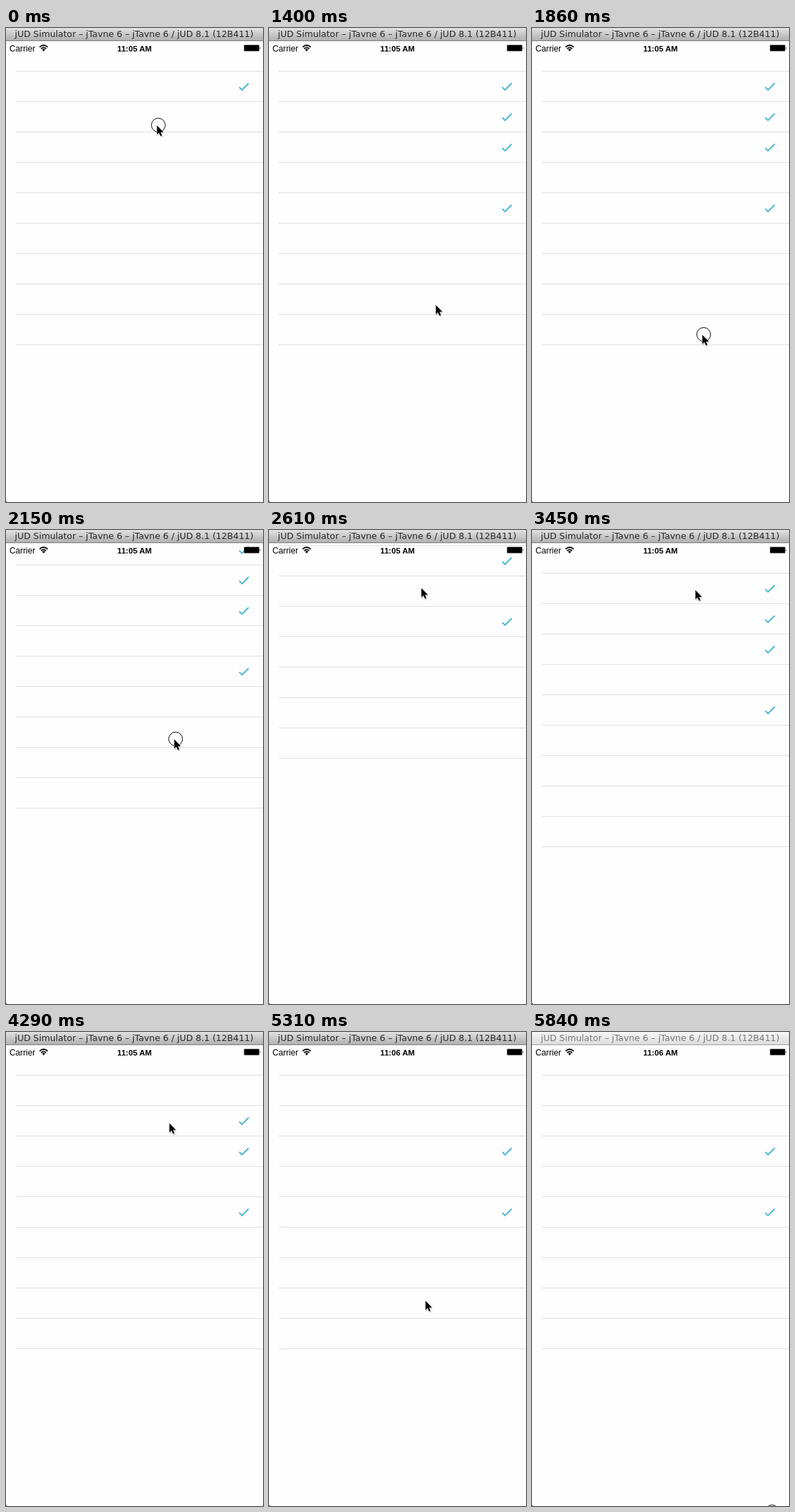
Recreate the animation shown at these times as an HTML page. Size 372x686 px, loop 5940 ms.

```html
<!DOCTYPE html>
<html lang="en">
<head>
<meta charset="utf-8">
<title>Checklist</title>
<style>
  html, body { margin: 0; width: 100%; height: 100%; overflow: hidden; background: #fefefe; }
  svg { display: block; width: 100%; height: 100%; }
  .title { font: 12.75px "DejaVu Sans", sans-serif; text-anchor: middle; }
  .status { font: 12.2px "Liberation Sans", Arial, sans-serif; }
  .clock { font: bold 11.6px "Liberation Sans", Arial, sans-serif; text-anchor: middle; }
  .rule { fill: #dfdfe1; }
  .check { fill: none; stroke: #45b4d0; stroke-width: 1.9; }
</style>
</head>
<body>
<svg viewBox="0 0 372 686">
  <defs>
    <linearGradient id="active" x2="0" y2="1">
      <stop offset="0" stop-color="#e2e2e2"/>
      <stop offset="1" stop-color="#b0b0b0"/>
    </linearGradient>
    <linearGradient id="inactive" x2="0" y2="1">
      <stop offset="0" stop-color="#f7f7f7"/>
      <stop offset="1" stop-color="#dcdcdc"/>
    </linearGradient>
    <clipPath id="screen"><path d="M0 19H372V686H0z"/></clipPath>
    <path id="arrow" d="M0 0V13.4L3 10.6L5.2 15.6L7.4 14.6L5.3 9.8H9.5z"/>
  </defs>
  <rect width="372" height="686" fill="#fefefe"/>
  <g clip-path="url(#screen)"><g id="list"></g></g>

  <text class="status" x="5" y="34">Carrier</text>
  <g fill="none" stroke="#000" stroke-width="1.8">
    <path d="M48.6 27.6Q54.5 22.4 60.4 27.6M50.8 30Q54.5 26.8 58.2 30"/>
    <path d="M52.2 31.2Q54.5 29.4 56.8 31.2L54.5 33.8z" fill="#000" stroke="none"/>
  </g>
  <text class="clock" id="clock" x="186" y="33.6"></text>
  <rect x="344.5" y="24.5" width="22" height="9" rx="1" fill="none" stroke="#000" stroke-opacity=".45"/>
  <rect x="345" y="25" width="21" height="8"/>
  <path d="M367.6 27.3Q369.4 29 367.6 30.9z"/>

  <rect id="bar" width="372" height="18"/>
  <rect id="edge" y="18" width="372" height="1"/>
  <text class="title" id="title" x="185.5" y="13">jUD Simulator – jTavne 6 – jTavne 6 / jUD 8.1 (12B411)</text>

  <circle id="ring" r="10" fill="none" stroke="#000"/>
  <g id="cursor">
    <use href="#arrow" x="1" y="2" opacity=".22"/>
    <use href="#arrow" stroke="#fff" paint-order="stroke"/>
  </g>
  <rect y="685" width="1" height="1"/>
</svg>
<script>
const LOOP = 5940, MINUTE = 5310, BLUR = 5840;
const TOP = 62, ROW = 44, HEIGHT = 668;
const drag = { start: 1800, end: 2568, slop: 37 };

// Pointer stops; a tap presses on arrival and toggles its row on leaving
const stops = [
  { x: 218, y: 141, arrive: 0, leave: 60, tap: 1 },
  { x: 225, y: 177, arrive: 515, leave: 700, tap: 2 },
  { x: 236, y: 251, arrive: 980, leave: 1170, tap: 4 },
  { x: 246, y: 450, arrive: 1512, leave: drag.start },
  { x: 220, y: 84, arrive: 2610, leave: 2610 },
  { x: 236, y: 87, arrive: 3300, leave: 3690 },
  { x: 236, y: 87, arrive: 3690, leave: 3820, tap: 0 },
  { x: 236, y: 132, arrive: 4200, leave: 4350 },
  { x: 236, y: 132, arrive: 4350, leave: 4480, tap: 1 },
  { x: 226, y: 389, arrive: 4770, leave: BLUR },
  { x: 345, y: 695, arrive: BLUR, leave: LOOP, tap: 9 }
];
const grip = stops[3];

const $ = id => document.getElementById(id);
const show = on => on ? "visible" : "hidden";
const ease = s => s * s * (3 - 2 * s);

function set(el, attrs) {
  for (const k in attrs) el.setAttribute(k, attrs[k]);
  return el;
}

function add(tag, attrs) {
  const el = document.createElementNS("http://www.w3.org/2000/svg", tag);
  return $("list").appendChild(set(el, attrs));
}

// Sideways travel lags behind vertical travel
function pointer(t) {
  const i = stops.findIndex(s => t < s.leave);
  const b = stops[i];
  if (t >= b.arrive) return b;
  const a = stops[i - 1];
  const p = ease((t - a.leave) / (b.arrive - a.leave));
  return { x: a.x + (b.x - a.x) * p ** 2.5, y: a.y + (b.y - a.y) * p };
}

function isPressed(t) {
  return t >= grip.arrive && t < drag.end
    || stops.some(s => "tap" in s && t >= s.arrive && t < s.leave);
}

// The first row starts checked
function isChecked(row, t) {
  const taps = stops.filter(s => s.tap === row && t >= s.leave).length;
  return (taps + (row === 0)) % 2 === 1;
}

// Rubber band while held, damped spring after release
function offset(t) {
  if (t < drag.start) return 0;
  if (t > drag.end) {
    const s = (t - drag.end) * 0.0127;
    return offset(drag.end) * (1 + s) * Math.exp(-s);
  }
  const pull = Math.max(0, grip.y - pointer(t).y - drag.slop) * 0.56;
  return HEIGHT * pull / (HEIGHT + pull);
}

const checks = [];
for (let i = 0; i < 10; i++) {
  const y = TOP + i * ROW;
  add("rect", { class: "rule", x: 14, y, width: 358, height: 1 });
  checks.push(add("path", { class: "check", d: `M337.6 ${y + 23.6}l4 4 9.6-9.6` }));
}

function draw(now) {
  const t = now % LOOP, away = t >= BLUR;
  const tip = pointer(t), x = Math.round(tip.x), y = Math.round(tip.y);

  set($("list"), { transform: `translate(0 ${-Math.round(offset(t))})` });
  checks.forEach((el, row) => set(el, { visibility: show(isChecked(row, t)) }));
  set($("cursor"), { transform: `translate(${x + 0.5} ${y})` });
  set($("ring"), { cx: x + 2.5, cy: y - 0.5, visibility: show(isPressed(t)) });

  $("clock").textContent = t < MINUTE ? "11:05 AM" : "11:06 AM";
  set($("bar"), { fill: `url(#${away ? "inactive" : "active"})` });
  set($("edge"), { fill: away ? "#a0a0a0" : "#808080" });
  set($("title"), { fill: away ? "#777" : "#262626" });
}

const start = performance.now();
function tick() {
  draw(performance.now() - start);
  requestAnimationFrame(tick);
}
tick();
</script>
</body>
</html>
```
